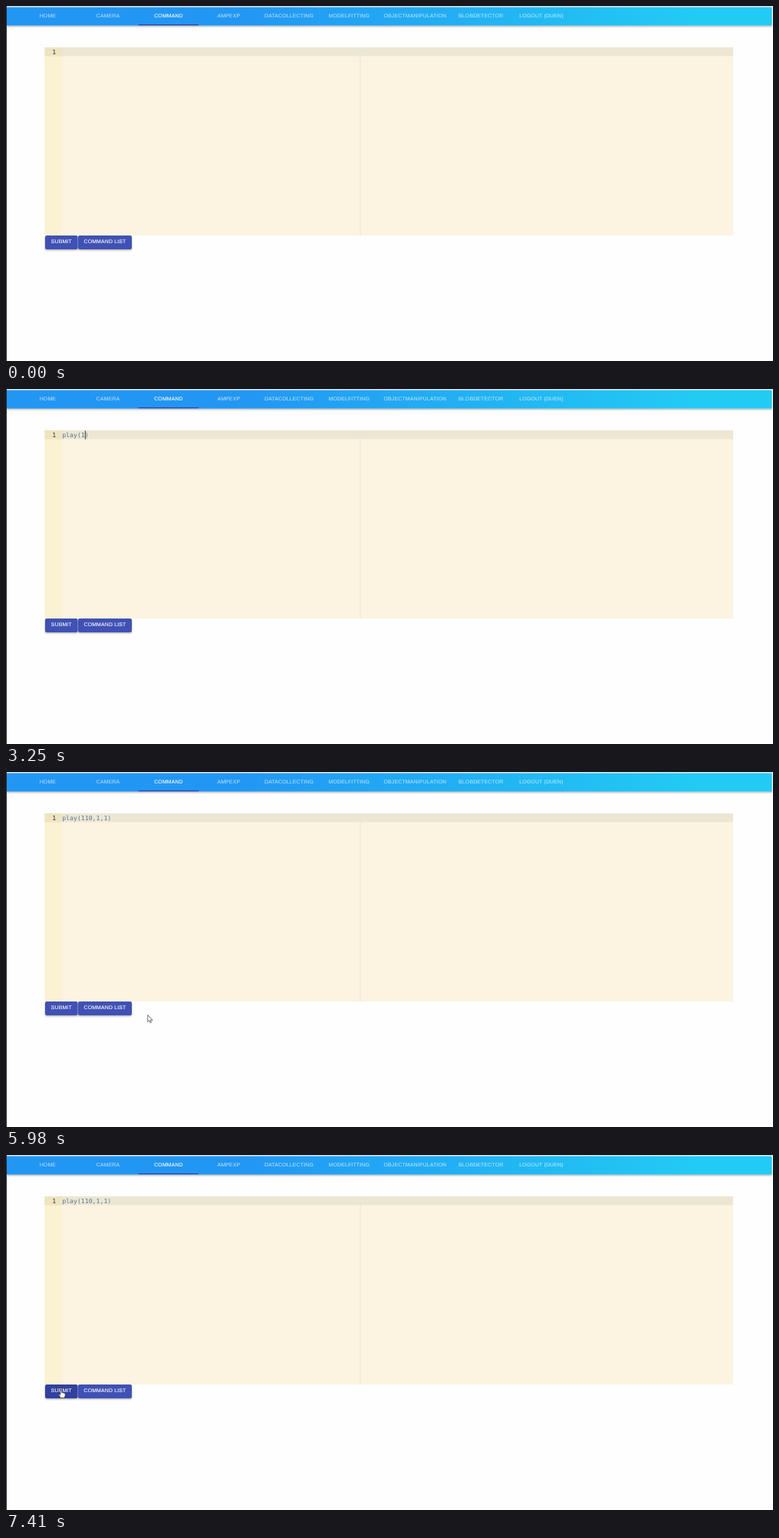
An HTML page that plays this animation: 1000 by 464 pixels, repeating every 8000 ms.

```html
<!DOCTYPE html>
<html lang="en">
<head>
<meta charset="utf-8">
<title>Command editor</title>
<style>
  html, body { margin: 0; width: 100%; height: 100%; overflow: hidden; background: #fefefe; }
  svg { display: block; width: 100vw; height: 100vh; }
  text { text-rendering: geometricPrecision; white-space: pre; }
  .ui { font: 6.87px "Liberation Sans", Arial, sans-serif; letter-spacing: .196px; fill: #fff; stroke: #fff; stroke-width: .12px; text-anchor: middle; }
  .code { font: 8.2px "DejaVu Sans Mono", monospace; fill: #5f7590; }
</style>
</head>
<body>
<svg viewBox="0 0 1000 464">
  <defs>
    <linearGradient id="sky">
      <stop offset=".3" stop-color="#2196f3"/>
      <stop offset=".9" stop-color="#21cbf3"/>
    </linearGradient>
    <filter id="shade" x="-5%" y="-50%" width="110%" height="220%">
      <feDropShadow dx="0" dy="1.2" stdDeviation="1.2" flood-opacity=".35"/>
    </filter>
    <clipPath id="submitBox"><rect x="51" y="300" width="42.5" height="18" rx="2"/></clipPath>
  </defs>

  <rect width="1000" height="1" fill="#e4e4e4"/>
  <rect x="1" y="1.5" width="997.5" height="24" fill="url(#sky)" filter="url(#shade)"/>
  <rect x="172.5" y="24" width="78.5" height="1.2" fill="#3a3f9f"/>
  <g id="tabs" class="ui"></g>

  <rect x="50.5" y="54" width="897.5" height="246" fill="#fcf4e1"/>
  <rect x="50.5" y="54" width="22.5" height="246" fill="#fbf1d3"/>
  <rect x="50.5" y="54" width="897.5" height="11.5" fill="#ebe7d3"/>
  <rect x="50.5" y="54" width="22.5" height="11.5" fill="#ede5c1"/>
  <rect x="461.3" y="54" width="1" height="246" fill="#e9e5d8"/>
  <text class="code" x="60.3" y="62.8" style="fill:#333">1</text>
  <text id="line" class="code" x="73.2" y="62.8"></text>
  <rect id="caret" y="54.5" width="1" height="11" fill="#333"/>

  <g filter="url(#shade)">
    <rect id="submit" x="51" y="300" width="42.5" height="18" rx="2"/>
    <rect id="list" x="94" y="300" width="70" height="18" rx="2"/>
  </g>
  <circle id="ripple" cx="72" cy="309" fill="#fff" clip-path="url(#submitBox)"/>
  <g class="ui">
    <text x="72.3" y="310.4">SUBMIT</text>
    <text x="129" y="310.4">COMMAND LIST</text>
  </g>

  <rect width="1" height="464" fill="#2b2b2b"/>
  <g id="pointer" fill="#fff" stroke="#111" stroke-width=".6" stroke-linejoin="round">
    <path id="arrow" d="M0 0V9L2.1 7.1 3.5 10.2 4.8 9.6 3.5 6.6H6.3Z"/>
    <path id="hand" d="M-.9 .6Q0-.6 .9 .6V4Q2 3.3 2.5 4.3 3.5 3.8 4 4.8 5.2 4.4 5.4 5.8V7.8L4.4 10.8H-.6L-3 6.8Q-2.6 5.4-.9 6.7Z"/>
  </g>
</svg>
<script>
const $ = id => document.getElementById(id);
const LOOP = 8000, STEP = 130, CHAR = 4.937;

const tabs = [["HOME", 54.4], ["CAMERA", 133], ["COMMAND", 212], ["AMPEXP", 290.3],
  ["DATACOLLECTING", 369], ["MODELFITTING", 447.3], ["OBJECTMANIPULATION", 533.3],
  ["BLOBDETECTOR", 619.2], ["LOGOUT (DUEN)", 698]];
$("tabs").innerHTML = tabs.map(([name, x]) =>
  `<text x="${x}" y="15.2" opacity="${name === "COMMAND" ? 1 : .65}">${name}</text>`).join("");

// [time, text before the caret, caret visible]
const typing = [[0, "", 0], [650, "", 1], [1170, "", 0], [1560, "p", 1], [1820, "pl", 1],
  [2210, "pla", 1], [2470, "play", 1], [2990, "play(", 1], [3250, "play(1", 1],
  [3380, "play(11", 1], [3510, "play(110", 1], [4160, "play(110", 0], [4420, "play(110,", 1],
  [4680, "play(110,1", 1], [4940, "play(110,1,", 1], [5200, "play(110,1,1", 1],
  [5720, "play(110,1,1", 0], [6240, "play(110,1,1", 1], [6630, "play(110,1,1", 0]];

const clamp = v => Math.min(1, Math.max(0, v));
const mix = (a, b, u) => a + (b - a) * u;
const show = (id, on) => $(id).setAttribute("visibility", on ? "visible" : "hidden");
const blue = u => `rgb(${mix(63, 48, u)},${mix(81, 63, u)},${mix(181, 159, u)})`;

function draw(time) {
  const t = Math.floor(time % LOOP / STEP) * STEP;

  const [, text, on] = typing.findLast(s => s[0] <= t);
  $("line").textContent = text + (text.includes("(") ? ")" : "");
  $("caret").setAttribute("x", 73.2 + text.length * CHAR);
  show("caret", on);

  const u = clamp((t - 5720) / 650);
  const x = mix(260, 71.8, u), y = mix(325, 306.6, u);
  const over = x < 164 && y < 318;
  $("pointer").setAttribute("transform", `translate(${x} ${y})`);
  show("arrow", t >= 5720 && !over);
  show("hand", t >= 5720 && over);

  $("submit").setAttribute("fill", blue(clamp((t - 6240) / 250)));
  $("list").setAttribute("fill", blue(clamp((t - 5980) / 250) * clamp((6630 - t) / 250)));

  const r = clamp((t - 6500) / 520);
  $("ripple").setAttribute("r", r * 26);
  $("ripple").setAttribute("opacity", .25 * clamp((7150 - t) / 390));
}

const start = performance.now();
function tick() {
  draw(performance.now() - start);
  requestAnimationFrame(tick);
}
tick();
</script>
</body>
</html>
```
